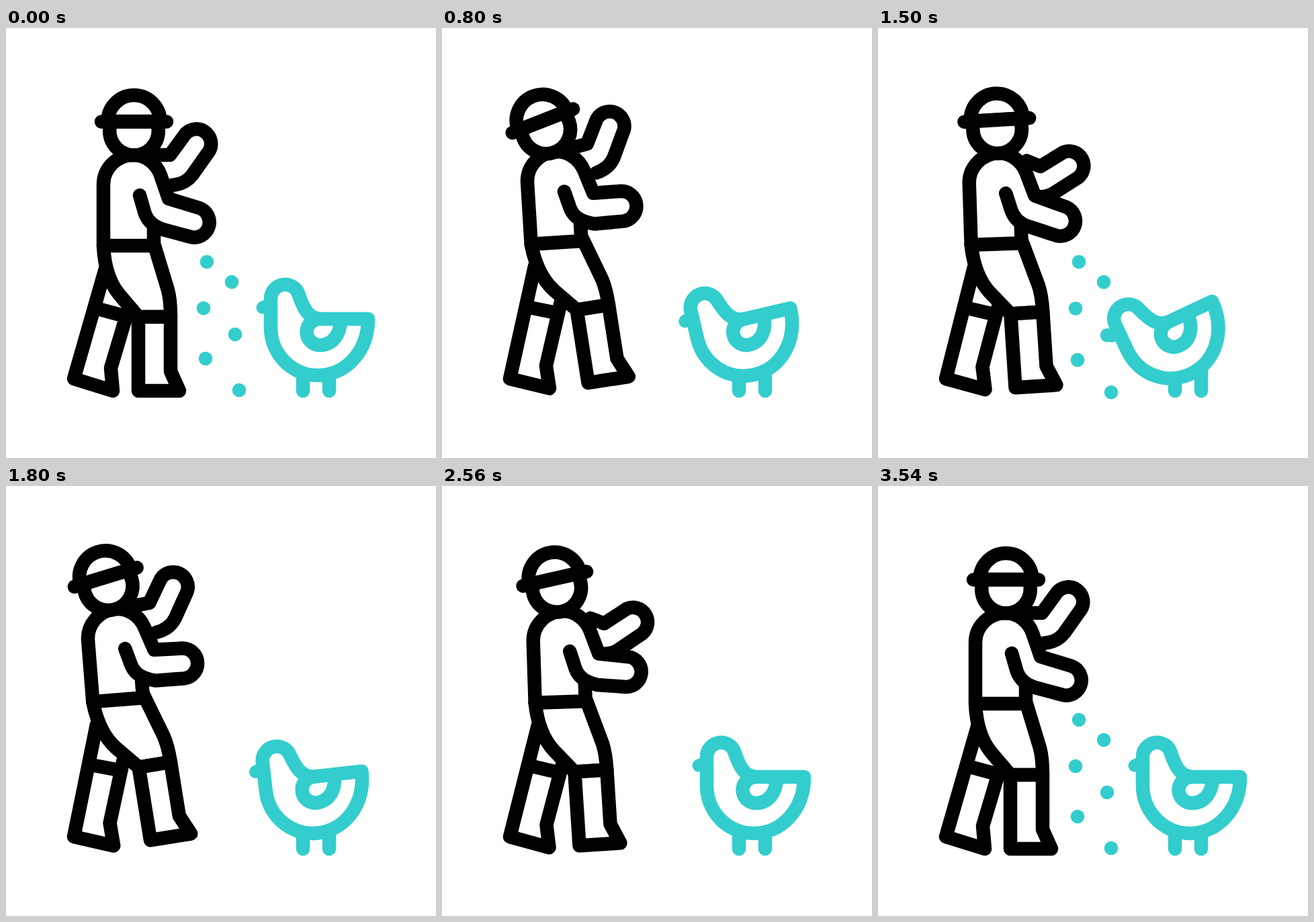
Write an HTML page that moves like this. It is 640 px wide and 640 px high and loops after 3.6 s.

```html
<!DOCTYPE html>
<html lang="en">
<head>
<meta charset="utf-8">
<title>Feeding the hen</title>
<style>
  html, body { margin: 0; width: 100%; height: 100%; overflow: hidden; background: #fff; }
  svg { display: block; width: 100vw; height: 100vh; }
  .ink { fill: #fff; stroke: #000; stroke-width: 20.5; stroke-linecap: round; stroke-linejoin: round; }
  .teal { stroke: #33cdcd; }
  #seeds { fill: #33cdcd; }
  .open { fill: none; }
</style>
</head>
<body>
<svg viewBox="0 0 640 640">
  <g id="seeds"></g>
  <g class="ink teal">
    <path d="M442 514V540M481 510V540"/>
    <g id="hen">
      <path d="M382 416L392 412" stroke-width="19"/>
      <path d="M394 403A21.3 21.3 0 0 1 436 398C442 415 449 433 469 433H539C539 482 505 517 464 517A70 71 0 0 1 394 446Z"/>
      <path class="open" d="M467 433A19.5 19.5 0 0 0 467 472C486 472 498 456 498 434"/>
    </g>
  </g>
  <g id="man" class="ink">
    <path id="backArm" d="M222 189H244L267.5 157A22 22 0 0 1 302.5 183L277 219Q266 233 246 234"/>
    <path d="M148 358L101 522L159 540L156 506L184 412"/>
    <path d="M137 418L176 428.5"/>
    <g id="frontLeg">
      <path d="M145 324Q147 370 168 396L197 430H245Q245 405 241 390L221 324"/>
      <path d="M197 430V540H258L245 511V430Z"/>
    </g>
    <path id="torso"/>
    <path class="open" d="M145 324H220V298"/>
    <g id="head">
      <circle cx="190.5" cy="153" r="36.3"/>
      <path d="M151.5 139A39 39 0 0 1 229.5 139Z"/>
      <path d="M142 139.5H239"/>
    </g>
  </g>
</svg>
<script>
const LOOP = 3600;
const $ = id => document.getElementById(id);

const ease = (t, from, to) => {
  const u = Math.min(1, Math.max(0, (t - from) / (to - from)));
  return u * u * (3 - 2 * u);
};
// Rises from 0 to 1, holds, and falls back
const pulse = (t, start, top, leave, end) => ease(t, start, top) - ease(t, leave, end);

// The man leans back twice; head and arms follow a little later
const firstLean = t => pulse(t, 0, 500, 600, 1220);
const secondLean = t => pulse(t, 1220, 1880, 1900, 3050);
const lean = t => firstLean(t) + secondLean(t);
const firstToss = t => pulse(t, 820, 1180, 1250, 1960);

// Angle in degrees and pivot of each part
const parts = {
  man: [t => -4.7 * lean(t), '101 522'],
  frontLeg: [t => -7.1 * firstLean(t) - 4.8 * secondLean(t), '158 324'],
  head: [t => -18 * lean(t - 165), '190 195'],
  backArm: [t => 38 * (firstToss(t) + pulse(t, 2100, 2780, 2900, 3540)) - 13 * lean(t - 70), '197 218'],
  hen: [t => -17.2 * pulse(t, 0, 500, 720, 980) - 34.5 * pulse(t, 1000, 1210, 1230, 2020), '460 514']
};
const forearm = t => 13.4 * (firstToss(t) + pulse(t, 2560, 3000, 3050, 3540)) - 19 * lean(t - 70);

function torsoPath(angle) {
  const a = angle * Math.PI / 180, c = Math.cos(a), s = Math.sin(a);
  const turn = (x, y) => {
    const dx = x - 237, dy = y - 275;
    return `${237 + dx * c - dy * s} ${275 + dx * s + dy * c} `;
  };
  return 'M145 324V233A45 44 0 0 1 190 189C208 189 224 202 230 219L242 254L'
    + turn(288, 268) + 'A22.5 22.5 0 0 1 ' + turn(275, 311)
    + 'L' + turn(234, 300) + 'C215 294 208 283 205 270L199 249';
}

const seeds = [[299, 348], [336, 378], [294, 417], [341, 456], [297, 492], [347, 539]].map(([x, y], i) => {
  const dot = document.createElementNS('http://www.w3.org/2000/svg', 'circle');
  dot.setAttribute('cx', x);
  dot.setAttribute('r', 10.3);
  $('seeds').append(dot);
  return { dot, y, lag: 21 * (5 - i) };
});

// Seeds slow down towards their resting place, then speed up away from it
function fall(u) {
  return u < 0 ? -0.00156 * u * u : 0.000286 * u * u;
}

// Distance from the resting place, or null while the seeds are away
function seedOffset(t, lag) {
  if (t < 490) return fall(Math.max(0, t - lag));
  if (t > 900 && t < 1630) return fall(t - 1394 - lag);
  return t > 2900 ? fall(Math.min(0, t - 3430 - lag)) : null;
}

function draw(t) {
  for (const [id, [angle, pivot]] of Object.entries(parts))
    $(id).setAttribute('transform', `rotate(${angle(t)} ${pivot})`);
  $('torso').setAttribute('d', torsoPath(forearm(t)));
  for (const { dot, y, lag } of seeds) {
    const offset = seedOffset(t, lag);
    const shown = offset !== null && y + offset > 235;
    dot.setAttribute('visibility', shown ? 'visible' : 'hidden');
    if (shown) dot.setAttribute('cy', y + offset);
  }
}

const start = performance.now();
function tick() {
  draw((performance.now() - start) % LOOP);
  requestAnimationFrame(tick);
}
tick();
</script>
</body>
</html>
```
